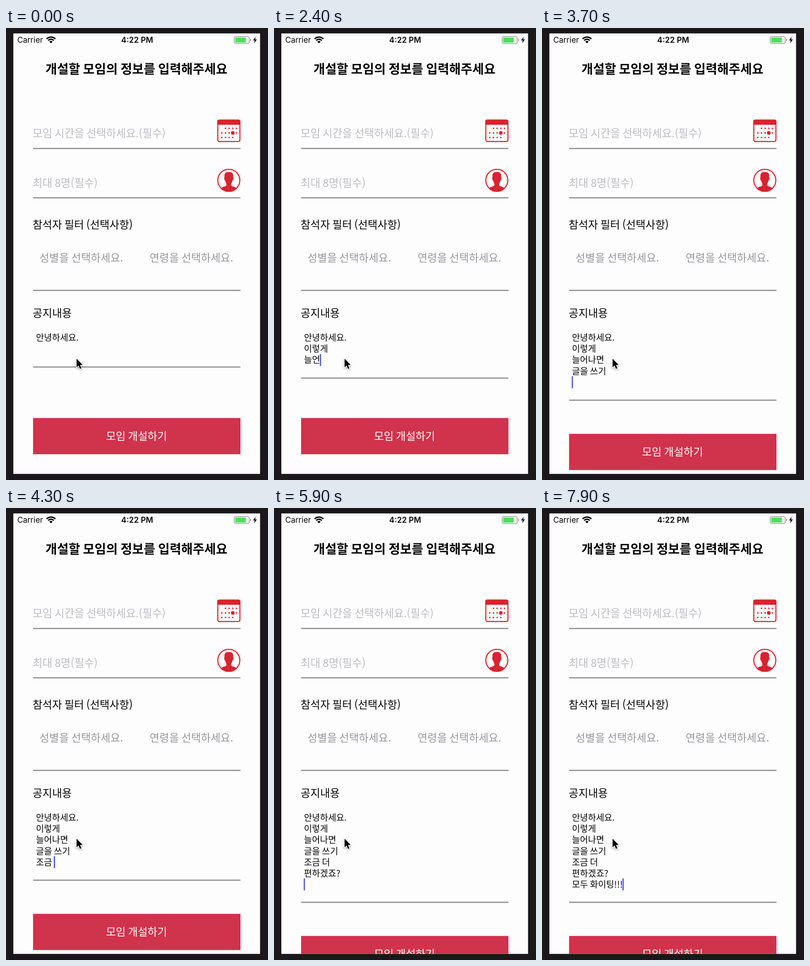
An HTML page with a canvas for the animation above (8000 ms loop, 571 by 981 pixels).

```html
<!DOCTYPE html>
<html lang="ko">
<head>
<meta charset="utf-8">
<title>모임 개설</title>
<style>
  html, body { margin: 0; width: 100%; height: 100%; overflow: hidden; background: #1a181a; }
  canvas { display: block; width: 571px; height: 981px; }
</style>
</head>
<body>
<canvas id="stage"></canvas>
<script>
const W = 571, H = 981, LOOP = 8000, TICK = 100;
const RED = '#d8242f', GRAY = '#98979b', HINT = '#bcbbc0', BLACK = '#050505';
const KO = '"Noto Sans CJK KR", "Noto Sans CJK", "Noto Sans CJK JP", sans-serif';
const EN = 'Inter, Roboto, sans-serif';
const NOTE_X = 64.8, NOTE_SIZE = 19.1, LINE_H = 24.08;

const canvas = document.getElementById('stage');
const ctx = canvas.getContext('2d');
const dpr = window.devicePixelRatio || 1;
canvas.width = W * dpr;
canvas.height = H * dpr;

// Typing script: states of the current line, "/" starts a new line.
let done = '안녕하세요.\n', current = '';
const keys = [{ t: -480, text: done }];

function type(from, to, script) {
  const states = script.split('|');
  const step = (to - from) / Math.max(1, states.length - 1);
  states.forEach((state, i) => {
    if (state === '/') {
      done += current + '\n';
      current = '';
    } else {
      current = state;
    }
    keys.push({ t: from + i * step, text: done + current });
  });
}

type(100, 700, '이|일|이러|이렇|이렇ㄱ|이렇게|/');
type(2010, 2890, 'ㄴ|느|늘|늘ㅇ|늘어|늘언|늘어나|늘어남|늘어나며|늘어나면|/|ㄱ|그');
type(2960, 3500, '글|글ㅇ|글으|글을|글을 |글을 ㅆ|글을 쓰|글을 쓱|글을 쓰기');
type(3700, 4490, '/|ㅈ|조|족|조그|조금|조금 |조금 ㄷ|조금 더|/');
type(4600, 5400, 'ㅍ|펴|편|편ㅎ|편하|편학|편하게|편하겠|편하겠ㅈ');
type(5500, 5900, '편하겠죠|편하겠죠?|/');
type(6300, 6690, 'ㅁ|모|몯|모두|모두 ');
type(6780, 7000, '모두 ㅎ|모두 호|모두 화|모두 황|모두 화이');
type(7300, 7300, '모두 화잍');
type(7500, 7900, '모두 화이티|모두 화이팅|모두 화이팅!|모두 화이팅!!|모두 화이팅!!!');

function text(str, x, y, size, color, weight = 400, family = KO) {
  ctx.font = `${weight} ${size}px ${family}`;
  ctx.fillStyle = color;
  ctx.fillText(str, x, y);
}

function rect(x, y, w, h, color) {
  ctx.fillStyle = color;
  ctx.fillRect(x, y, w, h);
}

function roundRect(x, y, w, h, r) {
  ctx.beginPath();
  ctx.roundRect(x, y, w, h, r);
}

function dot(x, y, r, color) {
  ctx.beginPath();
  ctx.arc(x, y, r, 0, Math.PI * 2);
  ctx.fillStyle = color;
  ctx.fill();
}

function poly(points) {
  ctx.beginPath();
  points.forEach(([x, y]) => ctx.lineTo(x, y));
  ctx.closePath();
}

const rule = y => rect(59, y - 1.4, 452, 2.8, GRAY);

function wifi() {
  const a = -Math.PI * 0.75, b = -Math.PI * 0.25;
  ctx.strokeStyle = BLACK;
  ctx.lineWidth = 2.9;
  for (const r of [13.4, 8.7]) {
    ctx.beginPath();
    ctx.arc(98, 33.2, r, a, b);
    ctx.stroke();
  }
  ctx.beginPath();
  ctx.moveTo(98, 33.2);
  ctx.arc(98, 33.2, 5.3, a, b);
  ctx.fillStyle = BLACK;
  ctx.fill();
}

function battery() {
  roundRect(497.3, 18.4, 32.8, 15.4, 3.6);
  ctx.strokeStyle = '#8c8c8e';
  ctx.lineWidth = 1.3;
  ctx.stroke();
  roundRect(499.4, 20.5, 23.2, 11.2, 1.6);
  ctx.fillStyle = '#4fe05c';
  ctx.fill();
  roundRect(532, 23.6, 2, 5.2, [0, 2, 2, 0]);
  ctx.fillStyle = '#8c8c8e';
  ctx.fill();
  poly([[544.2, 19], [538.4, 27], [542, 27], [540.8, 33.2], [546.8, 24.8], [543, 24.8]]);
  ctx.fillStyle = BLACK;
  ctx.fill();
}

function calendar() {
  roundRect(461.6, 200, 48.2, 46.4, 3.5);
  ctx.strokeStyle = RED;
  ctx.lineWidth = 2.3;
  ctx.stroke();
  roundRect(460.5, 198.8, 50.4, 11.2, [4, 4, 0, 0]);
  ctx.fillStyle = RED;
  ctx.fill();
  [[1, 4], [0, 4], [0, 3]].forEach(([first, last], row) => {
    for (let col = first; col <= last; col++) {
      const chosen = row === 1 && col === 3;
      dot(470.3 + col * 8, 217.8 + row * 9.9, chosen ? 4 : 1.7, RED);
    }
  });
}

function person() {
  ctx.save();
  ctx.beginPath();
  ctx.arc(485.6, 330.6, 24, 0, Math.PI * 2);
  ctx.strokeStyle = RED;
  ctx.lineWidth = 2.3;
  ctx.stroke();
  ctx.clip();
  ctx.translate(485.6, 0);
  ctx.fillStyle = RED;
  ctx.beginPath();
  ctx.moveTo(0, 312.6);
  ctx.bezierCurveTo(8, 312.6, 10.2, 316, 9.3, 324);
  ctx.bezierCurveTo(11.2, 324, 9.6, 331, 8, 331);
  ctx.bezierCurveTo(7.4, 334.5, 6, 336.5, 5.2, 338);
  ctx.lineTo(5.4, 342);
  ctx.bezierCurveTo(9, 345, 16, 344.5, 17.5, 349);
  ctx.lineTo(17.5, 356);
  ctx.lineTo(-17.5, 356);
  ctx.lineTo(-17.5, 349);
  ctx.bezierCurveTo(-16, 344.5, -9, 345, -5.4, 342);
  ctx.lineTo(-5.2, 338);
  ctx.bezierCurveTo(-6, 336.5, -7.4, 334.5, -8, 331);
  ctx.bezierCurveTo(-9.6, 331, -11.2, 324, -9.3, 324);
  ctx.bezierCurveTo(-10.2, 316, -8, 312.6, 0, 312.6);
  ctx.fill();
  ctx.restore();
}

function pointer() {
  ctx.save();
  ctx.translate(153.8, 717.8);
  ctx.scale(1.08, 1.08);
  poly([[0, 0], [0, 17.4], [4, 13.7], [6.9, 20.4], [9.8, 19.1], [7, 12.6], [12.2, 12.3]]);
  ctx.shadowColor = 'rgba(0,0,0,0.4)';
  ctx.shadowBlur = 4 * dpr;
  ctx.shadowOffsetY = 1.5 * dpr;
  ctx.strokeStyle = '#fff';
  ctx.lineWidth = 2.4;
  ctx.lineJoin = 'round';
  ctx.stroke();
  ctx.shadowColor = 'transparent';
  ctx.fillStyle = '#000';
  ctx.fill();
  ctx.restore();
}

function form() {
  text('Carrier', 24.4, 32.4, 17.2, BLACK, 400, EN);
  text('4:22 PM', 251, 32.4, 17.2, BLACK, 600, EN);
  wifi();
  battery();
  text('개설할 모임의 정보를 입력해주세요', 86, 98.8, 27.4, BLACK, 600);
  text('모임 시간을 선택하세요.(필수)', 58, 237.2, 23.3, HINT);
  text('최대 8명(필수)', 58, 344.5, 23.4, HINT);
  text('참석자 필터 (선택사항)', 58, 435.2, 23.2, BLACK);
  text('성별을 선택하세요.', 73, 507.4, 23.2, GRAY);
  text('연령을 선택하세요.', 313, 507.4, 23.2, GRAY);
  text('공지내용', 58, 627, 23.2, BLACK);
  [261.5, 368.5, 569.5].forEach(rule);
  calendar();
  person();
}

// Caret stays lit after a key, then blinks with soft edges.
function caretAlpha(idle) {
  if (idle < 260) return 1;
  const q = (idle - 260) % 660;
  if (q < 170) return 1 - q / 170;
  if (q < 350) return 0;
  return Math.min(1, (q - 350) / 120);
}

function note(t) {
  let key = keys[0];
  for (const k of keys) if (k.t <= t + 0.01) key = k;
  const lines = key.text.split('\n');
  const last = lines.length - 1;
  lines.forEach((line, i) => text(line, NOTE_X + 0.4, 679.3 + i * LINE_H, NOTE_SIZE, BLACK));

  const bottom = 735.8 + (lines.length - 2) * 24;
  rule(bottom);
  const top = Math.max(846.5, bottom + 73);
  rect(59, top, 452, 78.6, '#d0334c');
  text('모임 개설하기', 218, top + 47.4, 23.2, '#fff', 500);

  ctx.font = `400 ${NOTE_SIZE}px ${KO}`;
  const x = NOTE_X + ctx.measureText(lines[last]).width;
  ctx.globalAlpha = caretAlpha(t - key.t);
  rect(x, 659.4 + last * LINE_H, 2.6, 26, '#4355d6');
  ctx.globalAlpha = 1;
}

function draw(t) {
  ctx.setTransform(dpr, 0, 0, dpr, 0, 0);
  rect(0, 0, W, H, '#1a181a');
  ctx.save();
  ctx.beginPath();
  ctx.rect(16, 11.7, 537.7, 956);
  ctx.clip();
  rect(0, 0, W, H, '#fefdfe');
  form();
  note(t);
  pointer();
  ctx.restore();
}

function frame() {
  const t = performance.now() % LOOP;
  draw(Math.floor(t / TICK) * TICK);
  requestAnimationFrame(frame);
}
frame();
</script>
</body>
</html>
```
